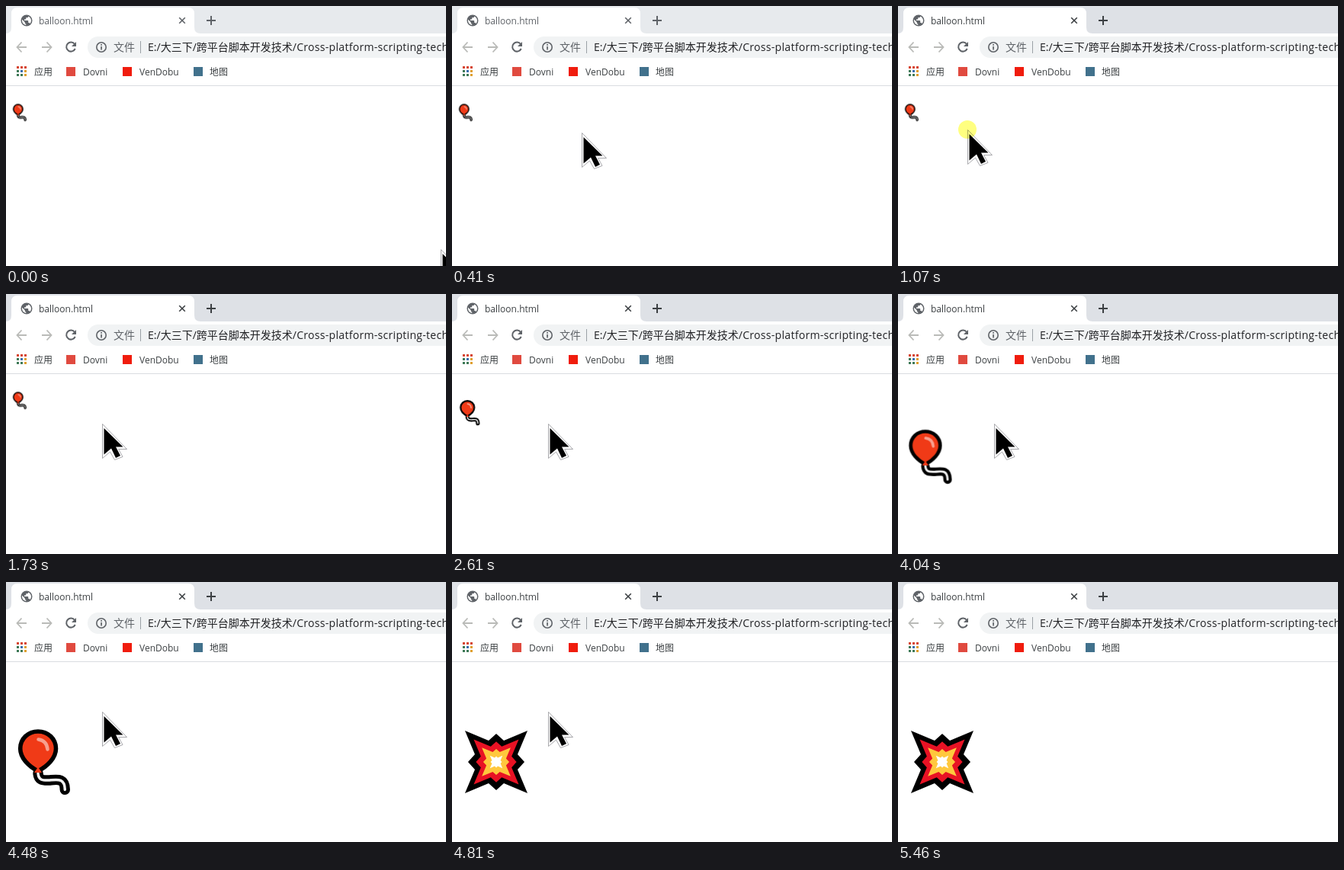
An HTML page that plays this animation: 577x341 px, repeating every 6 s.

```html
<!DOCTYPE html>
<html lang="zh">
<head>
<meta charset="utf-8">
<title>balloon.html</title>
<style>
html, body { margin: 0; width: 100%; height: 100%; overflow: hidden; background: #fff; }
svg { display: block; }
text { font: 12px "Open Sans", "Noto Sans CJK SC", "Noto Sans CJK", sans-serif; fill: #3c4043; }
.url { font-size: 14px; fill: #202124; }
.latin { letter-spacing: .3px; }
.line { fill: none; stroke: #5f6368; stroke-width: 2; }
.thin { stroke-width: 1.6; }
.dim { stroke: #babbb8; stroke-width: 1.8; }

.strip, .title, .button, .balloon, .blast, .cursor, .click {
  animation: 6s step-end infinite;
}
.strip { animation-name: strip; }
.title { animation-name: title; }
.button { animation-name: button; }
.balloon { animation-name: inflate; transform-origin: 6.5px 105.2px; }
.blast { animation-name: blast; }
.cursor { animation-name: move; }
.click { animation-name: click; mix-blend-mode: multiply; }

/* the window gains focus on the click */
@keyframes strip { 0% { fill: #e7eaed; } 17.83%, 100% { fill: #dee1e6; } }
@keyframes title { 0% { fill: #5f6368; } 17.83%, 100% { fill: #3c4043; } }
@keyframes button { 0% { stroke: #5f6368; } 17.83%, 100% { stroke: #3c4043; } }
@keyframes click { 0%, 19.66%, 100% { opacity: 0; } 17.83% { opacity: 1; } }

/* each key press makes it 10% larger */
@keyframes inflate {
  0% { transform: scale(.2633); }
  32.5% { transform: scale(.2897); }
  36.16% { transform: scale(.3186); }
  39.83% { transform: scale(.3505); }
  43.5% { transform: scale(.3855); }
  45.33% { transform: scale(.4241); }
  49% { transform: scale(.4665); }
  52.66% { transform: scale(.5132); }
  54.5% { transform: scale(.5645); }
  58.16% { transform: scale(.6209); }
  60% { transform: scale(.683); }
  63.66% { transform: scale(.7513); }
  67.33% { transform: scale(.8264); }
  71% { transform: scale(.9091); }
  74.66% { transform: scale(1); visibility: visible; }
  80.16%, 100% { transform: scale(1); visibility: hidden; }
}
@keyframes blast { 0% { visibility: hidden; } 80.16%, 100% { visibility: visible; } }

@keyframes move {
  0% { transform: translate(570px, 319px); visibility: visible; }
  1.66% { transform: translate(440px, 256px); }
  3.5% { transform: translate(290px, 198px); }
  5.16% { transform: translate(170px, 166px); }
  7% { transform: translate(104px, 159px); }
  8.66% { transform: translate(91px, 162px); }
  21.5% { transform: translate(98px, 163px); }
  23.33% { transform: translate(110px, 165px); }
  25.16% { transform: translate(121px, 168px); }
  27% { transform: translate(126px, 169px); }
  28.83% { transform: translate(126px, 170px); }
  89.16% { transform: translate(219px, 232px); visibility: visible; }
  91%, 100% { transform: translate(219px, 232px); visibility: hidden; }
}
</style>
</head>
<body>
<svg width="577" height="341" viewBox="0 0 577 341">
  <defs>
    <polygon id="star" points="-41,-41 -10,-28 0,-37 10,-28 41,-41 28,-10 37,0 28,10 41,41 10,28 0,37 -10,28 -41,41 -28,10 -37,0 -28,-10"/>
    <path id="string" d="M42 251C43 261 49 260 57 260C68 259 77 257 77.3 272.4" fill="none" stroke-linecap="round"/>
  </defs>

  <!-- tab strip -->
  <rect class="strip" width="577" height="36"/>
  <path d="M0 36Q7 36 7 28V10Q7 2 15 2H239Q247 2 247 10V28Q247 36 255 36Z" fill="#fff"/>
  <g transform="translate(18 10) scale(.75)">
    <circle cx="12" cy="12" r="10" fill="#5f6368"/>
    <path d="M11 20c-4-.5-7-4-7-8 0-.6 0-1.200.2-1.800L9 15v1c0 1.100.9 2 2 2zM17.900 17.400c-.3-.8-1-1.400-1.900-1.400h-1v-3c0-.6-.4-1-1-1H8v-2h2c.6 0 1-.4 1-1V7h2c1.100 0 2-.9 2-2v-.4c2.900 1.200 5 4 5 7.400 0 2-.8 4-2.100 5.400z" fill="#fff"/>
  </g>
  <text class="title" x="43" y="24">balloon.html</text>
  <path class="line thin button" d="M227.200 15.200l7.600 7.600m0-7.600l-7.600 7.600"/>
  <path class="line button" d="M263 19h12M269 13v12"/>

  <!-- toolbar -->
  <g class="line">
    <path class="dim" d="M27 54H15M20.500 47.500L14.500 54L20.500 60.500"/>
    <path class="dim" d="M47 54H59M53.500 47.500L59.500 54L53.500 60.500"/>
    <path d="M90 50A6 6 0 1 0 90.700 56"/>
  </g>
  <path d="M92 47V53H86Z" fill="#5f6368"/>
  <rect x="107" y="40" width="490" height="28" rx="14" fill="#f1f3f4"/>
  <circle class="line thin" cx="125" cy="54" r="6.200"/>
  <path d="M124.200 50h1.700v1.700h-1.700zM124.200 53h1.700v4.500h-1.700z" fill="#5f6368"/>
  <text class="url" x="141" y="59" style="fill:#5f6368">文件</text>
  <path d="M176.500 46V62" stroke="#9aa0a6"/>
  <text class="url" x="186" y="59">E:/大三下/跨平台脚本开发技术<tspan class="latin">/Cross-platform-scripting-tech</tspan></text>

  <!-- bookmarks -->
  <g stroke-width="3" stroke-dasharray="3 2">
    <path d="M14 80.500H27" stroke="#d6452f"/>
    <path d="M14 85.500H17M14 90.500H22" stroke="#3f7a58"/>
    <path d="M19 85.500H22" stroke="#3a6fb0"/>
    <path d="M24 85.500H27M24 90.500H27" stroke="#e0a030"/>
  </g>
  <text x="37" y="91">应用</text>
  <rect x="79" y="80" width="12" height="12" fill="#e04a3f"/>
  <text x="101" y="91">Dovni</text>
  <rect x="153" y="80" width="12" height="12" fill="#f01c0d"/>
  <text x="175" y="91">VenDobu</text>
  <rect x="246" y="80" width="12" height="12" fill="#41718c"/>
  <text x="267" y="91">地图</text>
  <path d="M0 104.500H577" stroke="#dadce0"/>

  <!-- balloon -->
  <g class="balloon">
    <use href="#string" stroke="#000" stroke-width="13.4"/>
    <path d="M42 196C55 196 65.500 205.500 65.500 218.500C65.500 231 54 242 42 248C30 242 18.700 231 18.700 218.500C18.700 205.500 29 196 42 196Z" fill="#f03a17" stroke="#000" stroke-width="5.600" stroke-linejoin="round"/>
    <use href="#string" stroke="#f2f2f2" stroke-width="3.5"/>
    <path d="M42 242.500L47 250H37Z" fill="#f03a17"/>
    <path d="M42.500 206.500Q53.500 208 54.500 219.500" fill="none" stroke="#f7a08f" stroke-width="4.5" stroke-linecap="round"/>
  </g>

  <!-- explosion -->
  <g class="blast" transform="translate(58 236)">
    <use href="#star"/>
    <use href="#star" transform="scale(.72)" fill="#e81224"/>
    <use href="#star" transform="scale(.46)" fill="#ffc83d"/>
    <use href="#star" transform="scale(.2)" fill="#fff"/>
  </g>

  <!-- pointer -->
  <g class="cursor">
    <path d="M.5 .5V45.500L10.500 37L16.500 47.500L27 43.500L21.500 33.500H32.500Z" fill="#fff" stroke="#a0a0a4" stroke-width=".9"/>
    <path d="M2.500 6V40.500L12 32.500L18 45L24 42L18 30.500H27.500Z"/>
  </g>
  <circle class="click" cx="91" cy="162" r="12" fill="#ffff80"/>
</svg>
</body>
</html>
```
